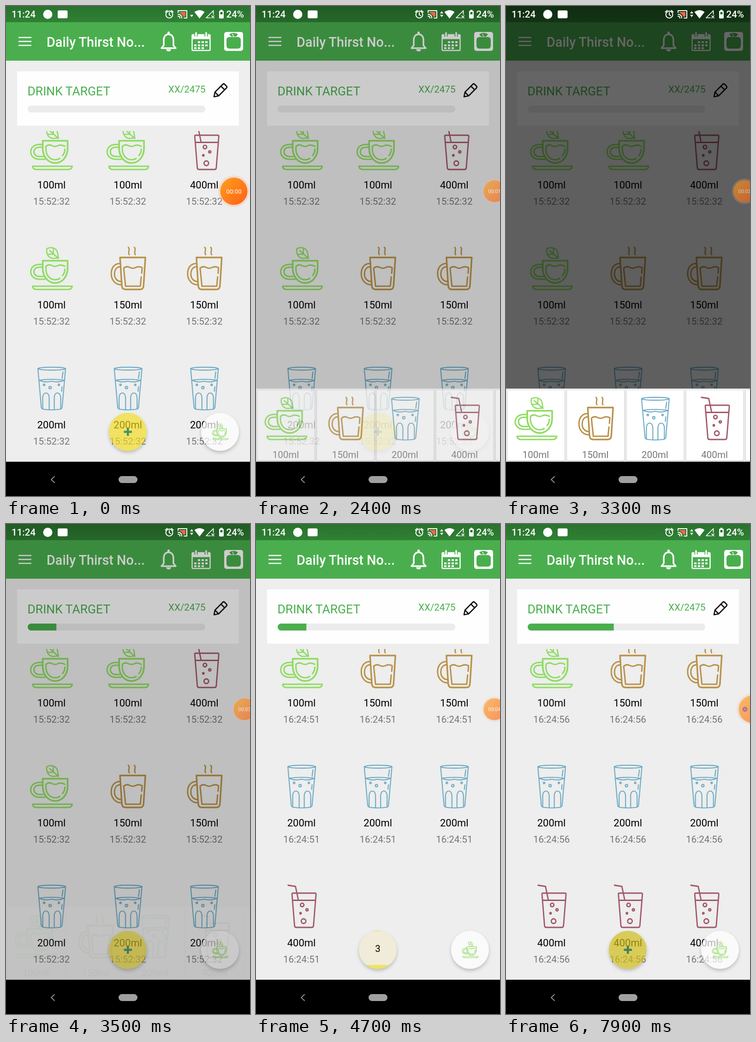
These frames come from a looping animation (529 by 1058 pixels, 8000 ms). An HTML page:

```html
<!DOCTYPE html>
<html lang="en">
<head>
<meta charset="utf-8">
<title>Drink tracker</title>
<style>
html, body { margin: 0; width: 100%; height: 100%; overflow: hidden; background: #000; }
svg { display: block; width: 100%; height: 100%; }
text { font-family: Roboto, "Open Sans", sans-serif; }
.mid { text-anchor: middle; }
.med { font-weight: 500; }
.amount { font-size: 22px; }
.time { font-size: 20.57px; fill: #747675; }
.line { fill: none; stroke-linecap: round; stroke-linejoin: round; }
</style>
</head>
<body>
<svg viewBox="0 0 529 1058">
<defs>
  <g id="cup" class="line" stroke="#8fdb62" stroke-width="3.6">
    <path d="M37 4C47 -1 58 3 60 12L62 24L50 25C40 24 35 14 37 4ZM43 8L62 25M51 5V14M40 16H50" stroke-width="2.6"/>
    <path d="M28 30H82V46C82 65 70 78 55 78C40 78 28 65 28 46Z"/>
    <path d="M35 42Q41 37 47 40Q54 44 60 41Q67 37 76 42M35 42V48C35 62 44 71 55 71Q61 71 65 68M71 62Q76 56 76 48" stroke-width="3"/>
    <path d="M28 38H21C9 38 2 45 2 54C2 64 11 70 21 70H33M28 44H21C13 44 9 48 9 54C9 60 14 64 21 64H29" stroke-width="3"/>
    <path d="M6 85H92Q91 92 84 92H14Q7 92 6 85Z" stroke-width="3"/>
  </g>
  <g id="mug" class="line" stroke="#b9914a" stroke-width="3.4">
    <path d="M48 1C53 6 46 11 50 17M61 1C66 6 59 11 63 17" stroke-width="2.8"/>
    <path d="M30 23H85L81 85Q80 92 73 92H42Q35 92 34 85Z"/>
    <path d="M30 36C17 36 11 46 11 58C11 72 20 82 33 82M31 43C22 43 18 50 18 59C18 68 24 75 33 75" stroke-width="3"/>
    <path d="M38 46Q44 41 50 44Q57 48 63 45Q70 41 78 45L77 57M76 65L74 85H42L38 46" stroke-width="3"/>
  </g>
  <g id="glass" class="line" stroke="#70abc6" stroke-width="2.2">
    <ellipse cx="47.5" cy="4" rx="30" ry="3.2"/>
    <path d="M17.5 4L25 88Q26 92 32 92Q47 94 63 92Q69 92 70 88L77.5 4"/>
    <path d="M20 29Q47 25 75 29M20 29Q33 35 47 31Q62 35 75 29M72 11L70 25M70 43L69 53"/>
    <path d="M28 91V67C28 53 42 53 42 67V92M53 92V67C53 53 67 53 67 67V91"/>
    <circle cx="31" cy="39" r="1.700"/><circle cx="44" cy="45" r="2.600"/><circle cx="63" cy="39" r="1.600"/>
  </g>
  <g id="soda" class="line" stroke="#a2576a" stroke-width="2.8">
    <path d="M18 1L34 3.5L40 32M28 18H76Q79 18 78.5 21L73 89Q72.5 92 69 92H36Q32.5 92 32 89L26.5 21Q26 18 28 18ZM28 33.5H77"/>
    <circle cx="48.5" cy="43.5" r="3.8"/><circle cx="59" cy="54" r="2.3"/>
    <circle cx="45" cy="61.5" r="1.5"/><circle cx="51.5" cy="78.5" r="5"/>
  </g>
  <clipPath id="listBox"><rect y="270" width="529" height="714"/></clipPath>
  <clipPath id="track"><rect x="47" y="215" width="385" height="15" rx="7.5"/></clipPath>
  <clipPath id="disc"><circle cx="264" cy="919.5" r="41"/></clipPath>
  <linearGradient id="orange" x2="1" y2="1"><stop stop-color="#ffa01c"/><stop offset="1" stop-color="#ff5f18"/></linearGradient>
  <linearGradient id="bar" x2="0" y2="1"><stop stop-color="#29722e"/><stop offset="1" stop-color="#2f8134"/></linearGradient>
  <filter id="blur" x="-30%" y="-30%" width="160%" height="160%"><feGaussianBlur stdDeviation="4"/></filter>
  <mask id="ringOnly" maskUnits="userSpaceOnUse" x="0" y="850" width="529" height="140">
    <rect y="850" width="529" height="140" fill="#fff"/>
    <circle cx="264" cy="919.5" r="41"/><circle cx="464" cy="919.5" r="41"/>
  </mask>
</defs>

<rect width="529" height="984" fill="#edeeed"/>
<rect width="529" height="36" fill="url(#bar)"/>
<rect y="35" width="529" height="83" fill="#4aae4e"/>

<!-- toolbar -->
<path d="M27 68H55M27 76.500H55M27 85H55" stroke="#fff" stroke-width="2.600"/>
<text class="med" x="88" y="87.500" font-size="28.800" fill="#fff">Daily Thirst No...</text>
<g class="line" stroke="#fff" stroke-width="3.500">
  <path d="M337 91H368L363 85V74C363 65 358 61 352.500 61S342 65 342 74V85Z"/>
  <path d="M352.500 60V57.500" stroke-width="5"/>
</g>
<path d="M347 93.500H358Q357 98 352.500 98T347 93.500Z" fill="#fff"/>
<g fill="none" stroke="#fff">
  <rect x="403.500" y="62" width="39" height="34" rx="2" stroke-width="2.500"/>
  <path d="M403.500 67H442.500" stroke-width="9"/>
  <path d="M412 57V66M434 57V66" stroke="#4aae4e" stroke-width="7"/>
  <path d="M412 58V66M434 58V66" stroke-width="3.500" stroke-linecap="round"/>
  <path d="M416 78H438M408 85H438M408 91H431" stroke-width="4" stroke-dasharray="5 3"/>
</g>
<rect x="473" y="56" width="41" height="41" rx="5" fill="#fff"/>
<rect x="478" y="67" width="31" height="25" rx="6" fill="#4aae4e"/>
<path d="M484 61Q493.500 55 503 61L499 66H488Z" fill="#4aae4e"/>
<path d="M493.500 66L491 60" stroke="#fff" stroke-width="1.500"/>

<!-- target card -->
<rect x="24" y="141" width="481" height="117.500" fill="#fdfefd"/>
<text x="46.500" y="193" font-size="26.450" fill="#4aae4e">DRINK TARGET</text>
<text x="432.500" y="187" font-size="20.570" fill="#4aae4e" text-anchor="end">XX/2475</text>
<g clip-path="url(#track)">
  <rect x="47" y="215" width="385" height="15" fill="#ebeceb"/>
  <rect id="fill" x="47" y="215" height="15" fill="#4aae4e"/>
</g>
<path class="line" d="M453 186L470 169Q472 167 474 169L478 173Q480 175 478 177L461 194L451 196ZM453 186L461 194M466 173L474 181" stroke="#111" stroke-width="2.600"/>

<g clip-path="url(#listBox)"><g id="list"></g></g>

<!-- floating buttons -->
<g mask="url(#ringOnly)"><g filter="url(#blur)" fill="#000" opacity=".25">
  <circle cx="264" cy="923.500" r="40"/><circle cx="464" cy="923.500" r="40"/>
</g></g>
<circle cx="264" cy="919.500" r="41" fill="#f3dd1a" fill-opacity=".66"/>
<path id="plus" d="M255.500 919.500H273M264.200 911V928" stroke="#4b8f68" stroke-width="4.600"/>
<g id="count">
  <rect id="cream" x="223" y="880" width="82" fill="#f0ecd9" clip-path="url(#disc)"/>
  <text id="digit" class="mid" x="264" y="924" font-size="20.570"></text>
</g>
<circle id="press" cx="264" cy="919.500" r="41"/>
<circle cx="464" cy="919.500" r="41" fill="#fff" fill-opacity=".7"/>
<use href="#cup" transform="translate(446.500 901.500) scale(.38)"/>

<rect id="scrim" width="529" height="984"/>

<!-- status bar -->
<g fill="#fff">
  <text class="med" x="12" y="25" font-size="20.570">11:24</text>
  <circle cx="90.500" cy="18" r="10"/>
  <rect x="112" y="9.500" width="21.500" height="17" rx="3"/>
  <path id="up" d="M399 16L402.500 11L406 16Z"/>
  <path d="M399 19H406L402.500 24Z"/>
  <path d="M408.500 13Q419.500 5 430.500 13L419.500 27Z"/>
  <rect x="462" y="10" width="10" height="17" rx="2"/><rect x="465" y="8" width="4" height="3"/>
  <text class="med" x="477.500" y="25" font-size="20.570">24%</text>
</g>
<rect x="464.500" y="13" width="5" height="5" fill="#28702d"/>
<g class="line" stroke="#fff" stroke-width="2">
  <circle cx="354" cy="18.500" r="7.500"/>
  <path d="M354 14V19L357 21M345.500 13L349.500 9.500M362.500 13L358.500 9.500"/>
  <path d="M373 14V10H392V26H386M373 18Q381 18 381 26M373 22Q377 22 377 26"/>
  <path d="M434 25.500L449.500 10V18M434 25.500H443M446 21L451 26M451 21L446 26" stroke-width="1.700"/>
</g>
<path d="M376 13H389V23H384Q382 16 376 15Z" fill="#ee6a45"/>

<g id="sheet">
  <rect y="826" width="529" height="158" fill="#ececec"/>
</g>

<rect y="984" width="529" height="74"/>
<path class="line" d="M105 1016L98 1022.500L105 1029" stroke="#8c8c8c" stroke-width="2"/>
<rect x="244" y="1015" width="41" height="15" rx="7.500" fill="#a0a0a0"/>

<!-- recorder bubble -->
<g id="rec">
  <circle r="34" fill="#f7b79a" fill-opacity=".35"/>
  <circle r="29.500" fill="url(#orange)"/>
  <text id="clock" class="mid" y="5" font-size="13.500" fill="#fff"></text>
  <g id="dot"><circle cx="-16" r="5.500" fill="#8b3a55"/><circle cx="-16" r="2" fill="#c76a6a"/></g>
</g>
</svg>
<script>
const $ = id => document.getElementById(id);
const set = (id, attrs) => { for (const k in attrs) $(id).setAttribute(k, attrs[k]); };
const ramp = (t, a, b) => Math.min(1, Math.max(0, (t - a) / (b - a)));
const ease = p => p * p * (3 - 2 * p);

const ml = { cup: 100, mug: 150, glass: 200, soda: 400 };
const rows = ['cup cup soda', 'cup mug mug', 'glass glass glass', 'soda soda soda'];

$('list').innerHTML = rows.map((row, r) => row.split(' ').map((kind, c) =>
  `<g class="item" transform="translate(${98.6 + c * 165.6} ${261 + r * 259})">
    <use href="#${kind}" x="-47"/>
    <text class="mid amount" y="132.500">${ml[kind]}ml</text>
    <text class="mid time" y="168"></text></g>`).join('')).join('');

// The fifth card only peeks in at the right edge.
$('sheet').innerHTML += [...Object.keys(ml), ''].map((kind, i) =>
  `<g transform="translate(${3 + i * 129.2} 830)">
    <rect x="-1" y="1" width="126" height="152" rx="3" fill="#d4d4d4"/>
    <rect width="124" height="151" rx="3" fill="#fff"/>` +
  (kind && `<use href="#${kind}" x="15" y="14"/>
    <text class="mid time" x="61.500" y="145.500">${ml[kind]}ml</text>`) + '</g>').join('');

const items = [...document.querySelectorAll('.item')];
const times = [...document.querySelectorAll('.item .time')];
const addTimes = [3400, 6500, 7700];

function draw(t) {
  const added = addTimes.filter(a => t >= a).length;
  set('fill', { width: 385 * added * 400 / 2475 });
  items.forEach((el, i) => el.style.display = i < 9 + added ? '' : 'none');
  const stamp = t < 3600 ? '15:52:32' : '16:24:' + (t < 6500 ? 51 : t < 7700 ? 54 : 56);
  times.forEach(el => el.textContent = stamp);
  set('list', { transform: `translate(0 ${-259 * ease(ramp(t, 3600, 4100))})` });

  set('scrim', { opacity: .6 * (ramp(t, 2100, 3000) - ramp(t, 3300, 3600)) });
  set('sheet', { opacity: ramp(t, 2100, 2510) - ramp(t, 3300, 3510) });

  // Countdown face of the round button
  const counting = ramp(t, 4100, 4400) * (t < 6000);
  const level = .1 * ramp(t, 4500, 4700) + .9 * ramp(t, 5100, 6000);
  set('count', { opacity: counting });
  set('plus', { opacity: 1 - counting });
  set('cream', { height: 80 * (1 - level) });
  $('digit').textContent = t < 5400 ? 3 : t < 5700 ? 2 : 1;
  const press = ramp(t, 1500, 1800) - ramp(t, 2100, 2300)
    + ramp(t, 6300, 6500) - ramp(t, 6600, 6900) + ramp(t, 7600, 7800);
  set('press', { opacity: .1 * press });

  // Bubble: full, then shrunk at the edge, then half hidden
  const dim = ease(ramp(t, 1200, 1600)), hide = ease(ramp(t, 5600, 6000));
  const x = 494 + 23 * dim + 17 * hide, size = 1 - .2 * dim + .2 * hide;
  set('rec', { transform: `translate(${x} 400) scale(${size})`, opacity: 1 - .35 * dim });
  set('clock', { opacity: 1 - hide });
  set('dot', { opacity: hide });
  const secs = [1200, 2500, 3400, 4600, 5600].filter(s => t >= s).length;
  $('clock').textContent = '00:0' + secs;
  set('up', { opacity: t < 200 ? 0 : 1 });
}

function frame(now) {
  draw(Math.floor(now % 8000 / 100) * 100);
  requestAnimationFrame(frame);
}
draw(0);
requestAnimationFrame(frame);
</script>
</body>
</html>
```
